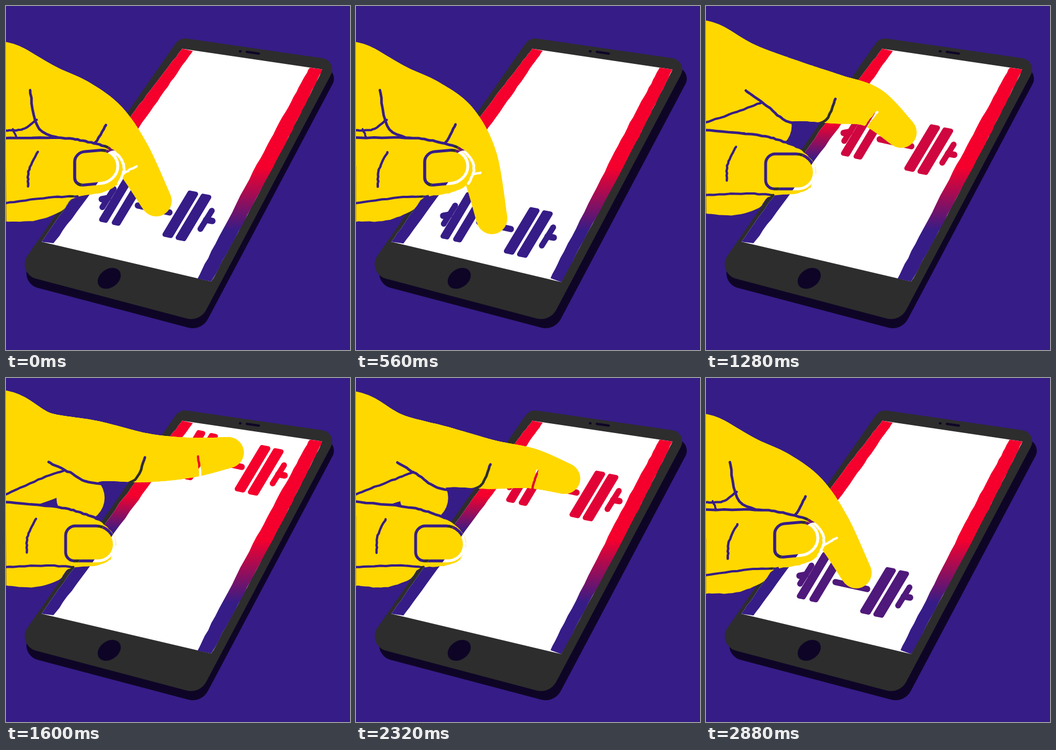
An HTML page with a canvas that plays this animation: 600 by 600 pixels, repeating every 2.96 s.

```html
<!DOCTYPE html>
<html lang="en">
<head>
<meta charset="utf-8">
<title>Phone workout</title>
<style>
html, body { margin: 0; width: 100%; height: 100%; overflow: hidden; background: #361c87; }
canvas { display: block; width: 600px; height: 600px; }
</style>
</head>
<body>
<canvas id="stage" width="600" height="600"></canvas>
<script>
const SIZE = 600, STEP = 80, LOOP = 2960;
const PURPLE = '#361c87', RED = '#f5002d', YELLOW = '#ffd800', GRAY = '#2d2d2d', INK = '#0e0526';

const ctx = document.getElementById('stage').getContext('2d');
const handLayer = document.createElement('canvas');
handLayer.width = handLayer.height = SIZE;
const hand = handLayer.getContext('2d');

// finger: knuckle, middle, joint and tip; tuck: how far the thumb is turned in.
const rest = { finger: [[118, 180], [172, 207], [218, 262], [262, 340]], palm: 171, web: 85, tuck: 1, lift: [-8, 6], mix: 0 };
const press = { ...rest, finger: [[118, 180], [172, 207], [212, 268], [237, 371]], lift: [-23, 35] };
const start = { ...rest, lift: [-12, 14], mix: .13 };
const drag = { finger: [[125, 180], [185, 200], [234, 222], [271, 328]], palm: 144, web: 85, tuck: .25, lift: [0, 0], mix: .3 };
const swipe = { finger: [[140, 167], [208, 185], [253, 212], [293, 311]], palm: 137, web: 85, tuck: 0, lift: [12, -20], mix: .6 };
const reach = { finger: [[150, 128], [240, 139], [320, 139], [388, 130]], palm: 130, web: 130, tuck: 0, lift: [118, -199], mix: 1 };

const keys = [
  [0, rest], [4, press], [8, press], [10, start], [12, drag], [14, swipe],
  [18, reach], [28, reach], [32, swipe], [34, drag], [36, start]
];

const lerp = (a, b, k) => Array.isArray(a) ? a.map((v, j) => lerp(v, b[j], k)) : a + (b - a) * k;
const shift = ([x, y], dx, dy) => [x + dx, y + dy];

function poseAt(i) {
  const n = Math.max(1, keys.findIndex(k => k[0] >= i));
  const [i0, a] = keys[n - 1], [i1, b] = keys[n];
  const pose = {};
  for (const part in a) pose[part] = lerp(a[part], b[part], (i - i0) / (i1 - i0));
  return pose;
}

// Catmull-Rom samples through points of any dimension.
function spline(p, steps = 8) {
  const out = [], at = j => p[Math.max(0, Math.min(p.length - 1, j))];
  for (let j = 0; j < p.length - 1; j++) {
    const [a, b, d, e] = [at(j - 1), at(j), at(j + 1), at(j + 2)];
    for (let s = 0; s <= steps; s++) {
      const u = s / steps;
      out.push(b.map((v, m) => v + .5 * u * (d[m] - a[m] +
        u * (2 * a[m] - 5 * v + 4 * d[m] - e[m] + u * (3 * (v - d[m]) + e[m] - a[m])))));
    }
  }
  return out;
}

// Small repeatable offset for the hand-drawn edge.
function rough(x, y, seed) {
  const s = Math.sin(x * 12.99 + y * 78.23 + seed * 37.7) * 43758.5;
  return (s - Math.floor(s) - .5) * 1.3;
}

function trace(c, points, seed) {
  c.beginPath();
  for (const [x, y] of points) c.lineTo(x + rough(x, y, seed), y + rough(y, x, seed));
}

function disc(c, x, y, r) {
  c.beginPath();
  c.arc(x, y, r, 0, 7);
  c.fill();
}

function stroke(c, color, width, x0, y0, x1, y1) {
  c.strokeStyle = color;
  c.lineWidth = width;
  c.beginPath();
  c.moveTo(x0, y0);
  c.lineTo(x1, y1);
  c.stroke();
}

function roundPoly(points, radii, fill) {
  const n = points.length;
  ctx.beginPath();
  ctx.moveTo(...lerp(points[n - 1], points[0], .5));
  points.forEach((p, j) => ctx.arcTo(...p, ...points[(j + 1) % n], radii[j]));
  ctx.closePath();
  ctx.fillStyle = fill;
  ctx.fill();
}

function fade(y0, y1) {
  const g = ctx.createLinearGradient(0, y0, 0, y1);
  g.addColorStop(0, RED);
  g.addColorStop(1, PURPLE);
  return g;
}

// Slanted band whose two long sides bow sideways.
function band([a, b, c, d], bowA, bowB, fill, seed) {
  const side = (p, q, bow) => spline([p, shift(lerp(p, q, .4), bow, 0), q], 18);
  trace(ctx, [...side(a, d, bowA), ...side(b, c, bowB).reverse()], seed);
  ctx.fillStyle = fill;
  ctx.fill();
}

function drawPhone(alt) {
  const face = [[303, 55], [580, 95], [338, 551], [16, 466]], radii = [20, 20, 30, 26];
  roundPoly(face.map(p => shift(p, 3 + 5 * alt, 16)), radii, INK);
  roundPoly(face, radii, GRAY);
  const [tl, tr, br, bl] = [[307, 75], [552, 111], [358, 481], [62, 411]];
  band([tl, tr, br, bl], -4, 2, '#fff', alt);
  band([tl, shift(tl, 19, 3), shift(bl, 21, 3), bl], -4, 2, fade(205, 268), alt);
  band([shift(tr, -22, -4), tr, br, shift(br, -24 + 5 * alt, -6)], -2, 3, fade(282, 392), alt);
  ctx.fillStyle = INK;
  ctx.beginPath();
  ctx.ellipse(180, 475, 22, 16, -.62, 0, 7);
  ctx.fill();
  stroke(ctx, INK, 4, 420, 80, 441, 83);
  stroke(ctx, INK, 4, 408, 79, 409, 79);
}

function drawDumbbell([x, y], mix) {
  const color = `rgb(${lerp([54, 28, 135], [245, 0, 45], mix).map(Math.round)})`;
  ctx.save();
  ctx.translate(x, y);
  ctx.fillStyle = color;
  for (const [px, width] of [[176, 16], [198, 16], [288, 19], [311, 19]]) {
    const foot = [px, 371 + (px - 176) * .235], head = shift(foot, 48, -80);
    const half = width / 2, tilt = half * .2;
    roundPoly([shift(foot, -half, -tilt), shift(head, -half, -tilt), shift(head, half, tilt), shift(foot, half, tilt)],
      [4, 4, 4, 4], color);
  }
  stroke(ctx, color, 11, 238, 342, 293, 354);
  for (const [ex, ey, way] of [[186, 329, -1], [357, 367, 1]]) {
    stroke(ctx, color, 10, ex - 10, ey + 16, ex + 10, ey - 16);
    stroke(ctx, color, 11, ex, ey, ex + way * 11, ey + 2);
  }
  ctx.restore();
}

function cut(points, width, seed) {
  hand.globalCompositeOperation = 'destination-out';
  trace(hand, spline(points), seed);
  hand.lineWidth = width;
  hand.stroke();
  hand.globalCompositeOperation = 'source-over';
}

// Creases are cut out, so whatever lies behind shows through.
function drawFinger({ finger, palm, web, tuck }, seed) {
  const [knuckle, middle, joint, tip] = finger;
  const radii = [110, 80, 54, 43, 35, 27];
  const bones = [[-20, palm], [52, palm + 7], ...finger].map((p, j) => [...p, radii[j]]);
  for (const [x, y, r] of spline(bones, 24)) disc(hand, x, y, r);
  disc(hand, web, 209, 42);

  const top = [knuckle[0] - 76, 147], under = shift(knuckle, 0, 55);
  const bend = shift(lerp(top, under, .5), -22 * tuck, 24 * tuck);
  const hook = [middle[0] - 20, (under[1] + middle[1] + 40) / 2];
  cut([top, bend, under, hook, shift(middle, 2, 0)], 4.5, seed);

  const fork = lerp(top, bend, .75);
  cut([[0, 203 + 14 * tuck], [fork[0] * .55, fork[1] + 17], fork], 4, seed);
  if (tuck > .5) cut([[12, 215], [18, 230]], 3.5, seed);

  const [dx, dy] = [tip[0] - joint[0], tip[1] - joint[1]], len = Math.hypot(dx, dy);
  const mid = lerp(joint, tip, .22);
  cut([mid, shift(mid, -20 * dy / len, 20 * dx / len), shift(mid, -36 * dy / len, 40 * dx / len)], 4, seed);
}

function drawThumb(tuck, seed) {
  const edge = [[0, 216], [90, 225], [130, 235], [166, 249], [188, 270], [194, 292], [185, 314], [158, 327]];
  const heel = [[112, 332], [92, 352], [50, 365], [0, 362]];
  hand.save();
  hand.transform(1 + .06 * tuck, -.1 * tuck, 0, 1, 0, 14 * tuck);
  trace(hand, spline([...edge, ...heel]), seed);
  hand.fill();
  cut(edge.slice(0, 7), 4.5, seed);
  cut([[52, 246], [38, 275], [36, 305]], 4, seed);
  cut([[0, 330], [70, 327], [118, 330]], 4, seed);
  hand.globalCompositeOperation = 'destination-out';
  hand.lineWidth = 5;
  hand.beginPath();
  hand.roundRect(104 + 9 * tuck, 258 - 5 * tuck, 85 - 14 * tuck, 61 - 3 * tuck, [20, 38, 34, 18]);
  hand.stroke();
  hand.restore();
}

function drawHand(pose, seed) {
  hand.clearRect(0, 0, SIZE, SIZE);
  hand.fillStyle = YELLOW;
  drawFinger(pose, seed);
  drawThumb(pose.tuck, seed);
  // White gleam behind the cut lines of the tucked thumb.
  if (pose.tuck > .5) {
    ctx.fillStyle = '#fff';
    disc(ctx, 189, 270, 18);
  }
  ctx.drawImage(handLayer, 0, 0);
}

for (const c of [ctx, hand]) c.lineCap = c.lineJoin = 'round';
const origin = performance.now();

function draw(now) {
  const i = Math.floor(Math.max(0, now - origin) % LOOP / STEP);
  const alt = i === 36 ? 1 : i % 2;
  const pose = poseAt(i);
  ctx.fillStyle = PURPLE;
  ctx.fillRect(0, 0, SIZE, SIZE);
  drawPhone(alt);
  drawDumbbell(pose.lift, pose.mix);
  drawHand(pose, alt);
  requestAnimationFrame(draw);
}
draw(origin);
</script>
</body>
</html>
```
